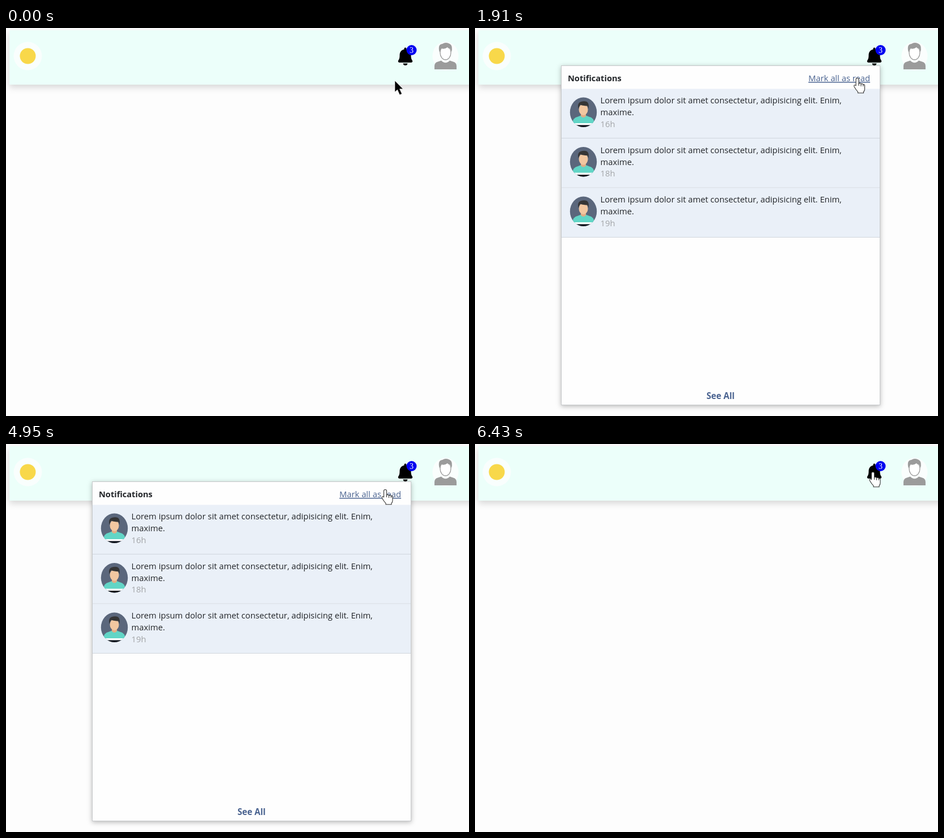
Animation, 818 px wide and 685 px high, one loop 7130 ms. Source, as an HTML page:

```html
<!DOCTYPE html>
<html lang="en">
<head>
<meta charset="utf-8">
<title>Notifications</title>
<style>
  html, body { margin: 0; height: 100%; overflow: hidden; background: #fdfdfd; }
  svg { display: block; width: 818px; height: 685px; }
  text { font: 14.78px "Open Sans", "Noto Sans", sans-serif; fill: #222529; }
  .bold { font-weight: 700; font-size: 14.6px; }
  .link { fill: #4a6390; }
  .time { fill: #a3a5a8; }
  .badge { font: 14px "Liberation Serif", serif; fill: #fff; text-anchor: middle; }
  #bar { filter: drop-shadow(0 5px 6px rgba(0, 0, 0, .15)); }
  #frame { filter: drop-shadow(0 2px 4px rgba(0, 0, 0, .28)); }
</style>
</head>
<body>
<svg viewBox="0 0 818 685">
  <defs>
    <clipPath id="oval"><ellipse cx="191.5" cy="41.2" rx="23.7" ry="26.2"/></clipPath>
    <g id="person" clip-path="url(#oval)">
      <rect x="167" y="14" width="49" height="54" fill="#5b677c"/>
      <path d="M172 62Q172 51 182 49L187 47H196L201 49Q211 51 211 62Z" fill="#62d5c6"/>
      <path d="M187 42H196V48Q191.500 53 187 48Z" fill="#e2ad85"/>
      <ellipse cx="191.500" cy="36.500" rx="8" ry="10" fill="#f2c7a0"/>
      <path d="M182.500 35Q180 23 190 22Q203 20 200.500 35L199 30Q191 30 186 28Q184 30 182.500 35Z" fill="#353535"/>
      <rect x="167" y="60.500" width="49" height="3.500" fill="#fff"/>
      <rect x="167" y="64" width="49" height="4" fill="#11151c"/>
    </g>
  </defs>

  <rect id="bar" x="6" y="4" width="820" height="96" fill="#ecfffa"/>
  <circle cx="38.500" cy="49.500" r="25" fill="#f9fefd"/>
  <circle cx="38.500" cy="49.500" r="14" fill="#f8d84a"/>

  <path d="M705.500 34.500q2 0 2 2v1.200c5.200 1 8 5 8 10.300 0 5.500 1 7.500 2.300 9.300 1 1.500.3 3.700-1.800 3.700h-21c-2.100 0-2.800-2.200-1.800-3.700 1.300-1.800 2.300-3.800 2.300-9.300 0-5.300 2.800-9.300 8-10.300v-1.200q0-2 2-2zM701.500 62.500h8q-.5 3.500-4 3.500t-4-3.500z"/>
  <circle cx="716.500" cy="39" r="9" fill="#0000f0"/>
  <text class="badge" x="716.500" y="44">3</text>

  <ellipse cx="776.500" cy="49.500" rx="23" ry="25" fill="#fafefd"/>
  <path d="M757 73V67Q757 61 763 59.500L769 57.500Q776.500 65 784 57.500L790 59.500Q796 61 796 67V73Z" fill="#9b9b9b"/>
  <ellipse cx="776.500" cy="43.500" rx="9.500" ry="12.500" fill="#fff" stroke="#9b9b9b" stroke-width="1.300"/>
  <path d="M766 43Q762 29 771 28Q777 24 784 28Q790 31 787 43L785 36Q782 37 780 34Q775 38 769 36Z" fill="#9b9b9b"/>

  <g id="panel">
    <rect id="frame" x="152.500" y="66.500" width="563" height="599" fill="#fefefe" stroke="#c6c8ca"/>
    <text class="bold" x="164" y="94">Notifications</text>
    <text class="link" id="mark" x="589" y="94">Mark all as read</text>
    <g id="rows"></g>
    <text class="bold link" style="font-size:15.1px" x="409" y="654.500">See All</text>
  </g>

  <circle id="ring" r="41.500" fill="none" stroke="#ed3c55" stroke-width="6"/>
  <g id="cursor">
    <path id="arrow" d="M0 0V20l4.500-4 4 9 4-1.700-4-8.600h6z" stroke="#fff" stroke-width=".6"/>
    <g id="hand" fill="#fff" stroke="#333" stroke-width="1.100">
      <path d="M-2.500 2a2.500 2.500 0 0 1 5 0v7q2-1.500 4 .7q2.500-1 3.800 1q2.600-.5 2.700 2v6q0 3-2 5v2h-10v-2q-3-3-6.500-9q-1-3 1-3q1.500 0 2 1.500z"/>
      <path d="M2.500 9v4M6.500 10v4M10.300 11v3"/>
    </g>
  </g>
</svg>
<script>
const LOOP = 7130, ROW_TOP = 107.5, ROW_HEIGHT = 87.5;
const $ = id => document.getElementById(id);
const show = (el, on) => el.style.display = on ? '' : 'none';
const within = (v, a, b) => v >= a && v < b;

$('rows').innerHTML = [16, 18, 19].map((hours, i) => `
  <g transform="translate(0 ${ROW_TOP + i * ROW_HEIGHT})">
    <rect class="fill" x="153" width="562" height="${ROW_HEIGHT}"/>
    <path d="M153 87h562" stroke="#d0d5dd"/>
    <use href="#person"/>
    <text x="221.5" y="25.500">Lorem ipsum dolor sit amet consectetur, adipisicing elit. Enim,</text>
    <text x="221.5" y="46.500">maxime.</text>
    <text class="time" x="221.5" y="67">${hours}h</text>
    <g class="more" fill="#aeb0b2">
      <circle cx="691.500" cy="35.500" r="1.600"/><circle cx="698" cy="35.500" r="1.600"/>
      <circle cx="704.500" cy="35.500" r="1.600"/><circle cx="697.500" cy="64" r="3.500"/>
    </g>
  </g>`).join('');
const rows = [...$('rows').children].map(row => ({
  fill: row.querySelector('.fill'), more: row.querySelector('.more')
}));

// Pointer moves: first step, last step, step count, destination
const moves = [
  [100, 490, 4, 703, 59],
  [1910, 2790, 6, 538, 239],
  [3130, 3430, 3, 567, 317],
  [4100, 4950, 7, 670, 81],
  [5080, 5240, 2, 702, 49],
  [6430, 6430, 1, 703, 50]
];

function pointerAt(t) {
  let x = 687, y = 93;
  for (const [start, end, count, toX, toY] of moves) {
    if (t < start) break;
    const gap = (end - start) / (count - 1) || 1;
    const p = Math.min(1, (Math.floor((t - start) / gap + 1e-6) + 1) / count);
    x += (toX - x) * p;
    y += (toY - y) * p;
  }
  return [x, y];
}

function ringAt(t) {
  if (within(t, 620, 1420)) return [703, 58, t < 1240 ? .72 : .35];
  if (within(t, 5660, 6430)) return [702, 49, t < 6290 ? .72 : .35];
  return [0, 0, 0];
}

function draw(t) {
  const [x, y] = pointerAt(t), [ringX, ringY, alpha] = ringAt(t);
  const open = within(t, 1040, 6290);
  const hovered = open && within(x, 152, 716) ? Math.floor((y - ROW_TOP) / ROW_HEIGHT) : -1;
  const onMark = open && within(x, 589, 699) && within(y, 78, 99);
  const onBell = within(x, 693, 719) && within(y, 34, 66);

  show($('panel'), open);
  rows.forEach((row, i) => {
    const lingering = i === 1 && within(t, 3130, 4100);
    row.fill.setAttribute('fill', i === hovered || lingering ? '#e8ecee' : '#eaf0f8');
    show(row.more, i === hovered);
  });
  $('mark').style.textDecoration = onMark ? 'underline' : 'none';

  const pointing = hovered >= 0 || onMark || onBell;
  show($('hand'), pointing);
  show($('arrow'), !pointing);
  $('cursor').setAttribute('transform', `translate(${x} ${y})`);
  $('ring').setAttribute('transform', `translate(${ringX} ${ringY})`);
  $('ring').style.opacity = alpha;
}

const began = performance.now();
function tick() {
  draw((performance.now() - began) % LOOP);
  requestAnimationFrame(tick);
}
tick();
</script>
</body>
</html>
```
